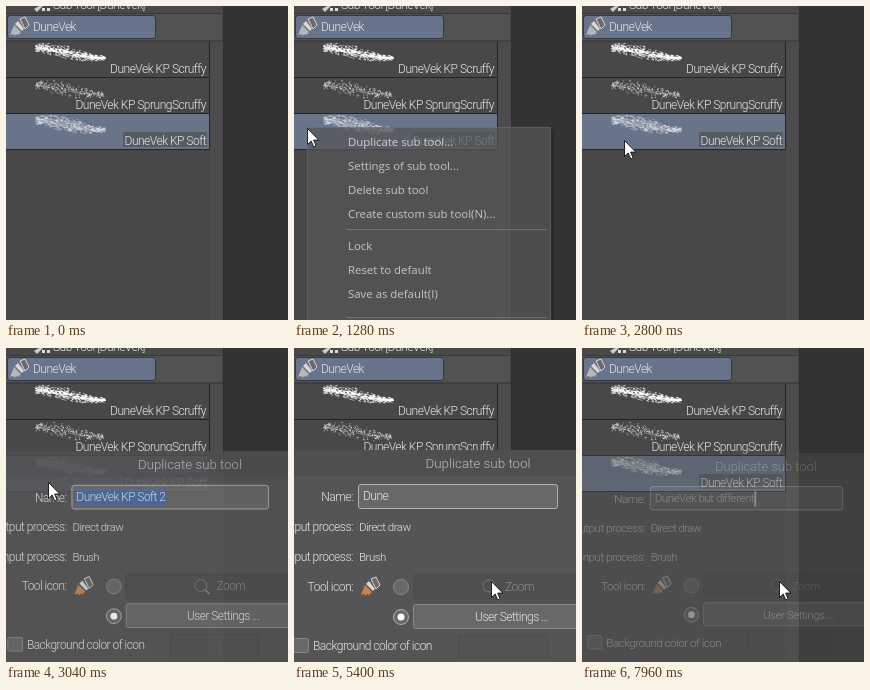
An HTML page that plays this animation: 282x314 px, repeating every 8000 ms.

```html
<!DOCTYPE html>
<html lang="en">
<head>
<meta charset="utf-8">
<title>Duplicate sub tool</title>
<style>
html, body { margin: 0; width: 100%; height: 100%; overflow: hidden; background: #333; }
svg { display: block; width: 282px; height: 314px; }
text { font: 300 12px Roboto, sans-serif; letter-spacing: -.5px; fill: #e8e8e8; white-space: pre; }
.end { text-anchor: end; }
.mid { text-anchor: middle; }
.dim { fill: #8c8c8c; }
.title { font-size: 13.4px; letter-spacing: 0; fill: #bcbcbc; }
.small { font-size: 11.5px; }
#menu text { font: 11.4px "Open Sans", sans-serif; letter-spacing: 0; fill: #f0f0f0; }
.field { fill: #686868; stroke: #8a8a8a; }
.off { fill: #4f4f4f; stroke: #4c4c4c; }
</style>
</head>
<body>
<svg viewBox="0 0 282 314">
  <defs>
    <g id="brush">
      <path d="M10 2l5-2 4 8-4 4z" fill="#6a6a6a" stroke="#dcd8d2"/>
      <path d="M8 4l6 8-2 2-7-7z" fill="#dcd8d2"/>
      <path d="M4 8l7 7-3 3-2-1-1 2-2-2-3 1z" fill="currentColor"/>
    </g>
  </defs>

  <g id="panel">
    <rect width="282" height="314" fill="#333"/>
    <rect width="217" height="314" fill="#484848"/>
    <rect width="216" height="35" fill="#525252"/>
    <rect x="204" y="36" width="13" height="278" fill="#4c4c4c"/>
    <rect x="217" width="2" height="314" fill="#303030"/>
    <rect width="216" height="7" fill="#494949"/>
    <rect y="7" width="216" height="1" fill="#383838"/>
    <path d="M28 3l5-3h4l-6 6z" fill="#ccc"/>
    <path d="M36 2h3v3h-3zM41 2h3v3h-3z" fill="#ddd"/>
    <text x="47" y="3">Sub Tool [DuneVek]</text>
    <rect x="1.500" y="9.500" width="148" height="23" rx="2.500" fill="#68748b" stroke="#34373d"/>
    <use href="#brush" x="4" y="11" color="#b4b6ba"/>
    <text x="27" y="25">DuneVek</text>
    <path d="M0 35h217" stroke="#333"/>
    <rect id="row" y="108" width="203" height="35"/>
    <path d="M0 71.500h204M0 107.500h204M0 143.500h204M203.500 36v108" stroke="#242424"/>
    <g id="strokes" fill="none" stroke="#fff"></g>
    <rect x="117" y="126" width="84" height="15" rx="1" fill="#484848" opacity=".55"/>
    <text class="end" x="200" y="67">DuneVek KP Scruffy</text>
    <text class="end" x="200" y="103">DuneVek KP SprungScruffy</text>
    <text class="end" x="200" y="139">DuneVek KP Soft</text>
  </g>

  <g id="menu">
    <rect x="15" y="124" width="245" height="200" fill="#000" opacity=".22"/>
    <rect x="13.500" y="121.500" width="243" height="200" fill="#565656" stroke="#686868"/>
    <rect id="hover" x="17" y="124" width="236" height="24" fill="#6b7990"/>
    <path d="M52 223.500h201M52 311.500h201" stroke="#858585"/>
  </g>

  <g id="dialog">
    <rect x="-80" y="102" width="460" height="340" fill="#555"/>
    <rect x="-80" y="102" width="460" height="26" fill="#4f4f4f"/>
    <text class="title mid" x="184" y="120">Duplicate sub tool</text>
    <text class="end" x="59" y="153">Name:</text>
    <rect class="field" x="64.500" y="136.500" width="199" height="24" rx="2.500" style="stroke:#b0b0b0"/>
    <rect id="sel" x="69" y="141" width="89" height="16" fill="#4c6ca6"/>
    <text id="name" x="69" y="152"></text>
    <rect id="caret" y="141" width="2" height="16" fill="#f2f2f2"/>
    <text class="end" x="59" y="183">Output process:</text>
    <text class="small" x="65" y="183">Direct draw</text>
    <text class="end" x="59" y="213">Input process:</text>
    <text class="small" x="65" y="213">Brush</text>
    <text class="end" x="59" y="243">Tool icon:</text>
    <use href="#brush" x="67" y="229" color="#c8824f"/>
    <circle class="field" cx="107" cy="239" r="7.500"/>
    <circle class="field" cx="107" cy="269" r="7.500" style="stroke:#b0b0b0"/>
    <circle cx="107" cy="269" r="3.500" fill="#fff"/>
    <rect class="off" x="119.500" y="226.500" width="200" height="25" rx="2"/>
    <path d="M199 242l5 5" stroke="#7a7a7a" stroke-width="2"/>
    <circle cx="195" cy="238" r="6" fill="none" stroke="#7a7a7a"/>
    <text class="dim" x="211" y="243">Zoom</text>
    <rect class="field" x="119.500" y="256.500" width="200" height="24" rx="2"/>
    <text x="181" y="273">User Settings ...</text>
    <rect class="field" x="-.5" y="290.500" width="15" height="14" rx="2"/>
    <text x="19" y="302">Background color of icon</text>
    <rect x="164.500" y="287.500" width="89" height="22" fill="#535353" stroke="#4d4d4d"/>
  </g>

  <path id="cursor" d="M.5.500v16l3.700-3.500 2.500 5.900 2.400-1-2.500-5.800h5.200z" fill="#fff" stroke="#111" stroke-width=".9"/>
</svg>
<script>
const LOOP = 8000, STEP = 40;
const $ = id => document.getElementById(id);
const put = (el, attrs) => { for (const k in attrs) el.setAttribute(k, attrs[k]); };
const add = (parent, tag, attrs, label = "") => {
  const el = document.createElementNS("http://www.w3.org/2000/svg", tag);
  put(el, attrs);
  el.textContent = label;
  parent.append(el);
};
const clamp = v => Math.max(0, Math.min(1, v));
const show = (el, on) => el.style.display = on ? "" : "none";

const menuItems = [
  ["Duplicate sub tool...", 140], ["Settings of sub tool...", 164],
  ["Delete sub tool", 188], ["Create custom sub tool(N)...", 212],
  ["Lock", 244], ["Reset to default", 268], ["Save as default(I)", 292]
];
for (const [label, y] of menuItems) add($("menu"), "text", { x: 54, y }, label);

// Seeded flecks, densest along the core of an S-shaped band
let seed = 7;
const rnd = () => (seed = (seed * 16807) % 2147483647) / 2147483647;
function bristle(y, count, half, len, opacity, width) {
  let d = "";
  for (let i = 0; i < count; i++) {
    const u = rnd() ** 1.1, side = (rnd() + rnd() - 1) * 1.2;
    const body = .4 + .6 * Math.sin(Math.PI * Math.min(1, u + .08));
    const x = 29 + u * 69;
    const cy = y + 10 * u * u * (3 - 2 * u) + side * half * body;
    const run = len * (.4 + rnd());
    const rise = run * .25 * Math.sin(Math.PI * u);
    d += `M${x.toFixed(1)} ${cy.toFixed(1)}l${run.toFixed(1)} ${rise.toFixed(1)}`;
  }
  add($("strokes"), "path", { d, opacity, "stroke-width": width });
}
bristle(42, 380, 6, 1.8, .8, .8);
bristle(42, 120, 3, 2.5, .9, 1);
bristle(79, 300, 6.5, 1.2, .65, .8);
bristle(114, 420, 7, 2.5, .3, 1.1);
bristle(114, 200, 6, 2, .45, .9);

// Cursor path: time, x, y
const path = [
  [560, 272, 262], [680, 160, 190], [800, 73, 140], [920, 38, 130], [1120, 13, 121.5],
  [2120, 13, 121.5], [2280, 28, 127], [2400, 38, 132], [2520, 42, 134],
  [3200, 42, 134], [3420, 100, 167], [3600, 175, 221], [3640, 189, 229], [3680, 197, 233]
];
function cursorAt(t) {
  let i = path.findIndex(p => p[0] > t);
  if (i < 0) return path[path.length - 1].slice(1);
  i = Math.max(i, 1);
  const [t0, x0, y0] = path[i - 1], [t1, x1, y1] = path[i];
  const k = clamp((t - t0) / (t1 - t0));
  return [x0 + (x1 - x0) * k, y0 + (y1 - y0) * k];
}

const typed = "DuneVek but different";
const keys = [4600, 4760, 4840, 5400, 5720, 5880, 5960, 6080, 6400, 6480, 6560,
  6760, 6840, 6920, 6960, 7120, 7200, 7320, 7400, 7480, 7600];
const caretOn = [[4600, 5040], [5600, 6160], [6760, 7240], [7880, LOOP]];

function drawName(t) {
  const picked = t < keys[0];
  const label = picked ? "DuneVek KP Soft 2" : typed.slice(0, keys.filter(k => k <= t).length);
  const name = $("name");
  if (name.textContent !== label) name.textContent = label;
  show($("sel"), picked);
  const lit = caretOn.some(([a, b]) => t >= a && t < b);
  show($("caret"), lit);
  const w = name.getComputedTextLength();
  if (picked) put($("sel"), { width: Math.round(w) + 1 });
  if (lit) put($("caret"), { x: Math.round(69 + w) });
}

function drawDialog(t) {
  const opening = 1 - (1 - clamp((t - 2920) / 240)) ** 3;
  const closing = clamp((t - 7850) / 183);
  const scale = .9 + .1 * opening - .055 * closing;
  const opacity = opening * (1 - closing);
  show($("dialog"), opacity > 0);
  put($("dialog"), {
    opacity,
    transform: `translate(180 200) scale(${scale}) translate(-180 -200)`
  });
}

function draw(t) {
  const [x, y] = cursorAt(t);
  show($("cursor"), t >= 560);
  put($("cursor"), { transform: `translate(${Math.round(x)} ${Math.round(y)})` });
  put($("row"), { fill: t >= 560 && t < 1200 && y < 143 ? "#788aa8" : "#68748a" });
  show($("menu"), t >= 1200 && t < 2800);
  put($("menu"), { opacity: clamp((t - 1160) / 160) });
  show($("hover"), x >= 17 && y >= 124);
  drawDialog(t);
  drawName(t);
}

const start = performance.now();
function tick() {
  const t = (performance.now() - start) % LOOP;
  draw(Math.floor(t / STEP) * STEP);
  requestAnimationFrame(tick);
}
tick();
</script>
</body>
</html>
```
